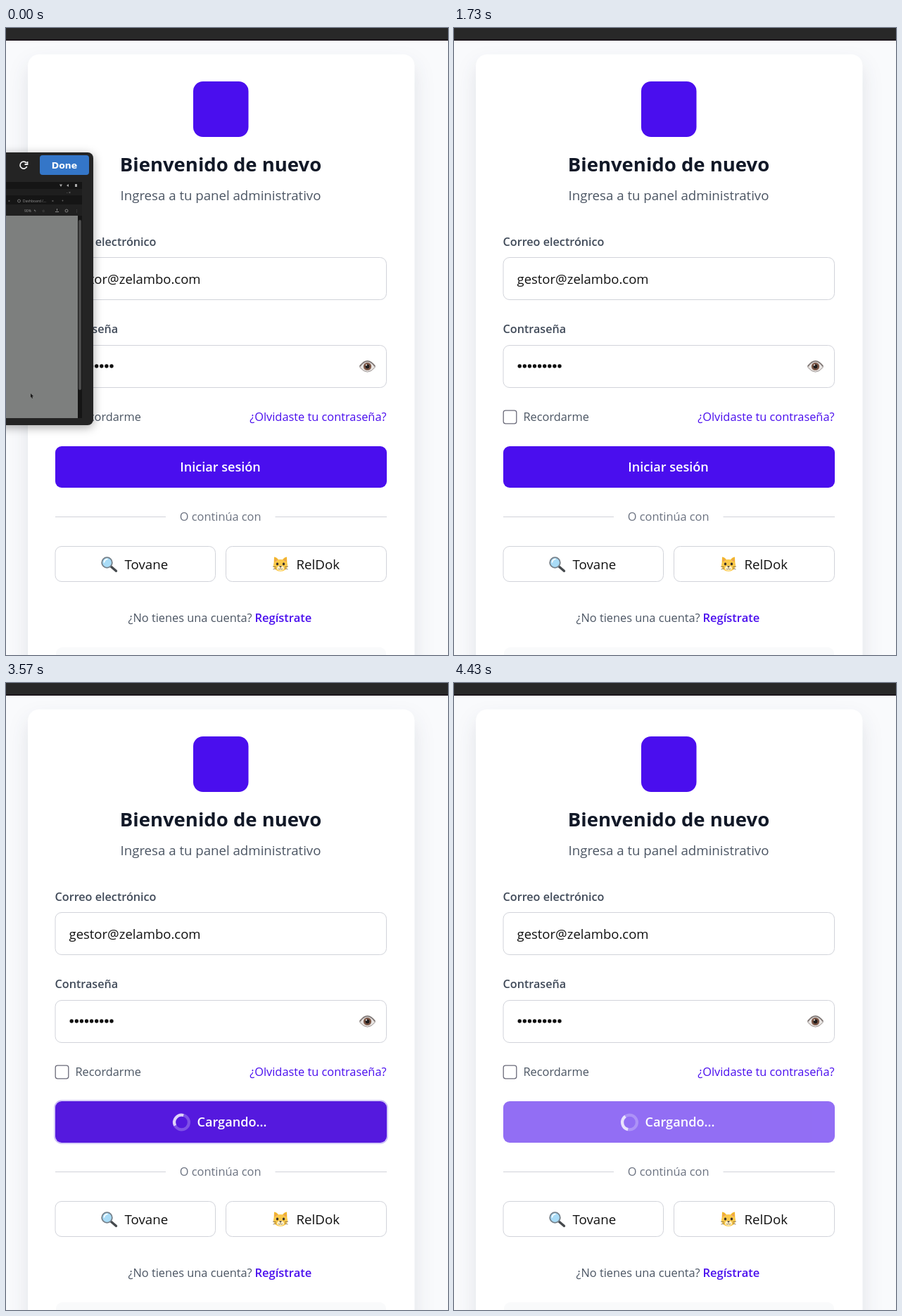
Recreate the animation shown at these times as an HTML page. Size 628 by 892 pixels, loop 4.47 s.

```html
<!DOCTYPE html>
<html lang="es">
<head>
<meta charset="utf-8">
<title>Inicio de sesión</title>
<style>
  html, body { margin: 0; width: 100%; height: 100%; overflow: hidden; background: #f9fafc; }
  svg { display: block; }
  text { font-family: "Open Sans", "Noto Sans", sans-serif; font-size: 16.35px; fill: #4b5563; }
  .mid { text-anchor: middle; }
  .title { font-size: 27.5px; font-weight: 700; fill: #111827; }
  .sub { font-size: 18.65px; }
  .label { font-size: 16.2px; font-weight: 600; fill: #404a59; }
  .value { font-size: 18.5px; fill: #111; }
  .action { font-size: 18.1px; font-weight: 600; fill: #fff; }
  .social { font-size: 18.7px; fill: #111; }
  .link { fill: #4a0eee; }
  .field { fill: #fff; stroke: #d1d3da; }
  .card { fill: #fff; filter: drop-shadow(0 14px 14px rgba(30, 35, 60, .11)); }
  .window { filter: drop-shadow(0 3px 7px rgba(0, 0, 0, .35)); }
  .window .tiny { font-size: 5px; fill: #999; }
  .window .done { font: 700 12.5px "DejaVu Sans", sans-serif; fill: #fff; }
</style>
</head>
<body>
<svg width="628" height="892" viewBox="0 0 628 892">
  <rect width="628" height="892" fill="#f9fafc"/>
  <rect class="card" x="31" y="37.500" width="549.5" height="900" rx="16"/>
  <rect width="628" height="17" fill="#282828"/>
  <rect y="16" width="628" height="2" fill="#1d171c"/>

  <rect x="266" y="76" width="78.500" height="79" rx="14" fill="#4a0eee"/>
  <text class="title mid" x="305" y="204">Bienvenido de nuevo</text>
  <text class="sub mid" x="305" y="245">Ingresa a tu panel administrativo</text>

  <text class="label" x="69.500" y="309.500">Correo electrónico</text>
  <rect class="field" x="70" y="326.500" width="470.500" height="60" rx="9"/>
  <text class="value" x="89.500" y="363.500">gestor@zelambo.com</text>

  <text class="label" x="69.500" y="434">Contraseña</text>
  <rect class="field" x="70" y="451.500" width="470.500" height="60" rx="9"/>
  <g id="hidden">
    <g id="dots"></g>
    <path d="M502.500 482.500Q513.500 467 524.500 482.500Q513.500 496 502.500 482.500Z" fill="#e8e4e2" stroke="#9b9492"/>
    <path d="M502.500 481.500Q513.500 466 524.500 481.500" fill="none" stroke="#7c7472" stroke-width="1.500"/>
    <circle cx="513.500" cy="481.500" r="5.600" fill="#7a5545"/>
    <circle cx="513.500" cy="481.500" r="2.900" fill="#1d1b1b"/>
    <circle cx="512" cy="479.500" r="1" fill="#fff"/>
  </g>
  <g id="shown">
    <text class="value" x="89.500" y="488" style="font-size:19px">Admin123!</text>
    <g stroke="#a06a47" stroke-width=".7">
      <circle cx="505" cy="480" r="2.600" fill="#dda673"/>
      <circle cx="522" cy="480" r="2.600" fill="#dda673"/>
      <ellipse cx="513.500" cy="480.500" rx="8" ry="8.500" fill="#b27d55"/>
      <ellipse cx="513.500" cy="486" rx="6" ry="4.500" fill="#e6b482"/>
      <path d="M510.500 487.500Q513.500 489.500 516.500 487.500" fill="none"/>
      <path d="M502.500 490.500Q502 483 507 478.500Q511 475 513 479Q512 483.500 508 484.500L507 490.500Z" fill="#dba673"/>
      <path d="M524.500 490.500Q525 483 520 478.500Q516 475 514 479Q515 483.500 519 484.500L520 490.500Z" fill="#dba673"/>
    </g>
  </g>

  <rect x="70.200" y="544.200" width="18.600" height="18.600" rx="3" fill="#fff" stroke="#6b6b7a" stroke-width="1.300"/>
  <text x="98.500" y="559">Recordarme</text>
  <text class="link" x="540.500" y="559" text-anchor="end">¿Olvidaste tu contraseña?</text>

  <rect id="ring" x="69" y="594" width="473" height="61" rx="10" fill="#fff" stroke="#b9aaf4" stroke-width="1.500"/>
  <g id="button">
    <rect id="fill" x="70" y="595" width="471" height="59" rx="9"/>
    <text id="login" class="action mid" x="304.500" y="631">Iniciar sesión</text>
    <g id="loading">
      <g fill="none" stroke="#fff" stroke-width="4.170" transform="translate(249.500 625)">
        <circle r="10.400" opacity=".25"/>
        <path id="arc" d="M0 -10.400A10.400 10.400 0 0 0 -7.800 6.880" opacity=".75"/>
      </g>
      <text class="action" x="271.500" y="631">Cargando...</text>
    </g>
  </g>

  <path d="M70 695.500H227M382.500 695.500H541" stroke="#d1d3da"/>
  <text class="mid" x="304.700" y="701" style="fill:#6b7280">O continúa con</text>

  <rect class="field" x="70" y="737.500" width="227.500" height="50" rx="9"/>
  <path d="M149 766L156.500 772.500" stroke="#45494d" stroke-width="3.400" stroke-linecap="round"/>
  <circle cx="143.500" cy="760.500" r="7.300" fill="#a9dcf7" stroke="#76818a" stroke-width="1.800"/>
  <path d="M139.500 760Q140 756 144 755.500" fill="none" stroke="#fff" stroke-width="1.600" stroke-linecap="round"/>
  <text class="social" x="168.500" y="769.500">Tovane</text>

  <rect class="field" x="312.500" y="737.500" width="228" height="50" rx="9"/>
  <path d="M380.500 764L381 752.500Q385 753 387 756.500H393Q395 753 399 752.500L399.500 764Z" fill="#f2b62c"/>
  <path d="M382.500 755.500L386 758L383 761ZM397.500 755.500L394 758L397 761Z" fill="#e58b83"/>
  <ellipse cx="390" cy="764.500" rx="10" ry="8.600" fill="#fbc94b"/>
  <ellipse cx="390" cy="768.500" rx="5" ry="3.600" fill="#fff0c8"/>
  <g fill="#3c332c">
    <ellipse cx="385.500" cy="762.500" rx="1.700" ry="2.100"/>
    <ellipse cx="394.500" cy="762.500" rx="1.700" ry="2.100"/>
    <path d="M388 765.500H392L390 768Z"/>
  </g>
  <path d="M387 769.500Q388.800 771 390 769Q391.200 771 393 769.500M379 766L384 767M379.500 770L384 769M401 766L396 767M400.500 770L396 769" fill="none" stroke="#75603e" stroke-width=".8"/>
  <text class="social" x="412.500" y="769.500">RelDok</text>

  <text x="173.500" y="845">¿No tienes una cuenta?</text>
  <text class="link" x="353.500" y="845" style="font-weight:600;font-size:16.500px">Regístrate</text>
  <rect x="71" y="881" width="469" height="60" rx="9" fill="#f9fafb"/>

  <g id="window" class="window">
    <rect x="-40" y="177" width="164" height="388" rx="8" fill="#242424"/>
    <path d="M29 192A5 5 0 1 0 29.700 197M30.500 190V194H26.500" fill="none" stroke="#f2f2f2" stroke-width="1.800"/>
    <rect x="48" y="181" width="70" height="28" rx="4" fill="#3476c8"/>
    <text class="done mid" x="83" y="199.500">Done</text>
    <rect y="219" width="108" height="336" fill="#151515"/>
    <rect y="229" width="108" height="9" fill="#1e1e1e"/>
    <rect y="251" width="108" height="16" fill="#202020"/>
    <path d="M76 222.500H80L78 226ZM86 224L89 222V226ZM98 222H101V226H98Z" fill="#aaa"/>
    <text class="tiny" x="86" y="236">-  ×</text>
    <text class="tiny" x="3" y="248">×</text>
    <circle cx="18.500" cy="246" r="2" fill="none" stroke="#999" stroke-width=".7"/>
    <text class="tiny" x="24" y="248">Dashboard /...</text>
    <text class="tiny" x="65" y="248">×</text>
    <text class="tiny" x="79" y="248">+</text>
    <text class="tiny" x="26" y="262">90%</text>
    <text class="tiny" x="39" y="262">↰</text>
    <text class="tiny" x="51" y="262">☆</text>
    <path d="M70 261.500H75M72.500 257V260" stroke="#999" stroke-width=".9"/>
    <circle cx="86" cy="260" r="2" fill="none" stroke="#999" stroke-width=".8"/>
    <text class="tiny" x="98" y="262">⋮</text>
    <rect y="267" width="102" height="288" fill="#7d7f7e"/>
    <rect x="103" y="273" width="4" height="242" rx="2" fill="#4b4b4b"/>
    <path d="M35 520L39 524L37.200 524.300L38 526.500L37 527L36 524.800L35 525.500Z" fill="#1b1b1b"/>
  </g>
</svg>
<script>
const LOOP = 4470, IDLE = [74, 14, 238], HOVER = [67, 0, 214];
const $ = id => document.getElementById(id);
const show = (id, on) => $(id).setAttribute('display', on ? 'inline' : 'none');
const ease = (t, start, length) => {
  const x = Math.min(1, Math.max(0, (t - start) / length));
  return x * x * (3 - 2 * x);
};

for (let i = 0; i < 9; i++)
  $('dots').innerHTML += `<circle cx="${93.2 + 7.1 * i}" cy="481" r="2.7" fill="#111"/>`;

function draw(t) {
  // The capture window fades in three steps.
  $('window').setAttribute('opacity', t < 100 ? 1 : t < 130 ? .7 : t < 170 ? .4 : 0);

  const revealed = t >= 970 && t < 1730 || t >= 2070 && t < 2570;
  show('shown', revealed);
  show('hidden', !revealed);

  const busy = t >= 3500, fade = ease(t, 3510, 200);
  const hover = ease(t, 2970, 200) * (1 - fade);
  const color = IDLE.map((c, i) => Math.round(c + (HOVER[i] - c) * hover));
  $('fill').setAttribute('fill', `rgb(${color})`);
  $('button').setAttribute('opacity', 1 - .4 * fade);
  $('ring').setAttribute('opacity', ease(t, 3460, 60) * (1 - fade));
  show('login', !busy);
  show('loading', busy);
  $('arc').setAttribute('transform', `rotate(${(t - 3530) * .36})`);
}

function tick() {
  draw(performance.now() % LOOP);
  requestAnimationFrame(tick);
}
tick();
</script>
</body>
</html>
```
